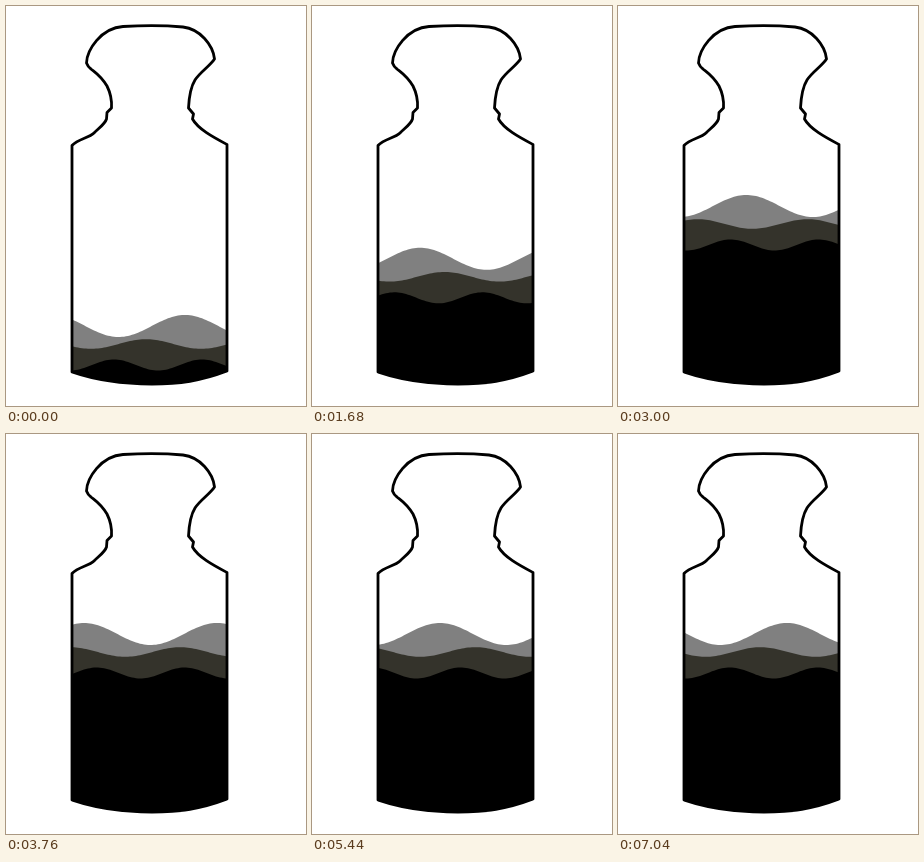
An HTML page for the animation above (7.08 s loop, 300 by 400 pixels).

```html
<!DOCTYPE html>
<html lang="en">
<head>
<meta charset="utf-8">
<title>Filling bottle</title>
<style>
html, body { margin: 0; width: 100%; height: 100%; overflow: hidden; background: #fff; }
svg { display: block; width: 100vw; height: 100vh; }
</style>
</head>
<body>
<svg viewBox="0 0 300 400">
  <defs>
    <path id="bottle" d="M80.5 57C81 44 95 22 117 20.5C136 19.5 160 19.5 177 21C194 23 207 39 208.5 53
      C204 60 194 66 189 74C184 82 183 92 182.5 102L187.5 108L186.5 113C192 123 207 131 221 138.5V365
      C195 375 173 378 146 378C116 378 92 375 66 366V139.5C72 133 83 132 88 127C93 122 99 118 100.5 113
      L101 106.5L105.5 102C106 94 105 88 101 80C95 70 90 67 85 63Q82 61 80.5 57Z"/>
    <clipPath id="inside"><use href="#bottle"/></clipPath>
  </defs>
  <g clip-path="url(#inside)" id="liquid"></g>
  <use href="#bottle" fill="none" stroke="#000" stroke-width="2.8" stroke-linejoin="round"/>
</svg>
<script>
const LOOP = 7080, FRAME = 40, FILL_TIME = 3000, RISE = 120;
const liquid = document.getElementById('liquid');

// Speed in px/s; drift is the extra sideways travel while filling
const waves = [
  { fill: '#808080', level: 200, amp: 11, length: 133, crest: 179, speed: 108.8, drift: 22 },
  { fill: '#34332b', level: 218, amp: 4.8, length: 110, crest: 140, speed: 124.5, drift: 6 },
  { fill: '#000', level: 239, amp: 5.5, length: 88, crest: 108, speed: 86.9, drift: 8 }
];

for (const wave of waves) {
  wave.path = document.createElementNS('http://www.w3.org/2000/svg', 'path');
  wave.path.setAttribute('fill', wave.fill);
  liquid.append(wave.path);
}

function outline({ level, amp, length, crest, speed, drift }, ms) {
  const filled = Math.min(ms / FILL_TIME, 1);
  const base = level + RISE * (1 - filled);
  const shift = crest + speed * ms / 1000 + drift * filled;
  let d = 'M60 400';
  for (let x = 60; x <= 228; x += 2) {
    const y = base - amp * Math.cos(2 * Math.PI * (x - shift) / length);
    d += `L${x} ${y.toFixed(2)}`;
  }
  return d + 'V400Z';
}

function draw(now) {
  const ms = Math.floor(now % LOOP / FRAME) * FRAME;
  for (const wave of waves) wave.path.setAttribute('d', outline(wave, ms));
}

const start = performance.now();
function tick() {
  draw(performance.now() - start);
  requestAnimationFrame(tick);
}
tick();
</script>
</body>
</html>
```
